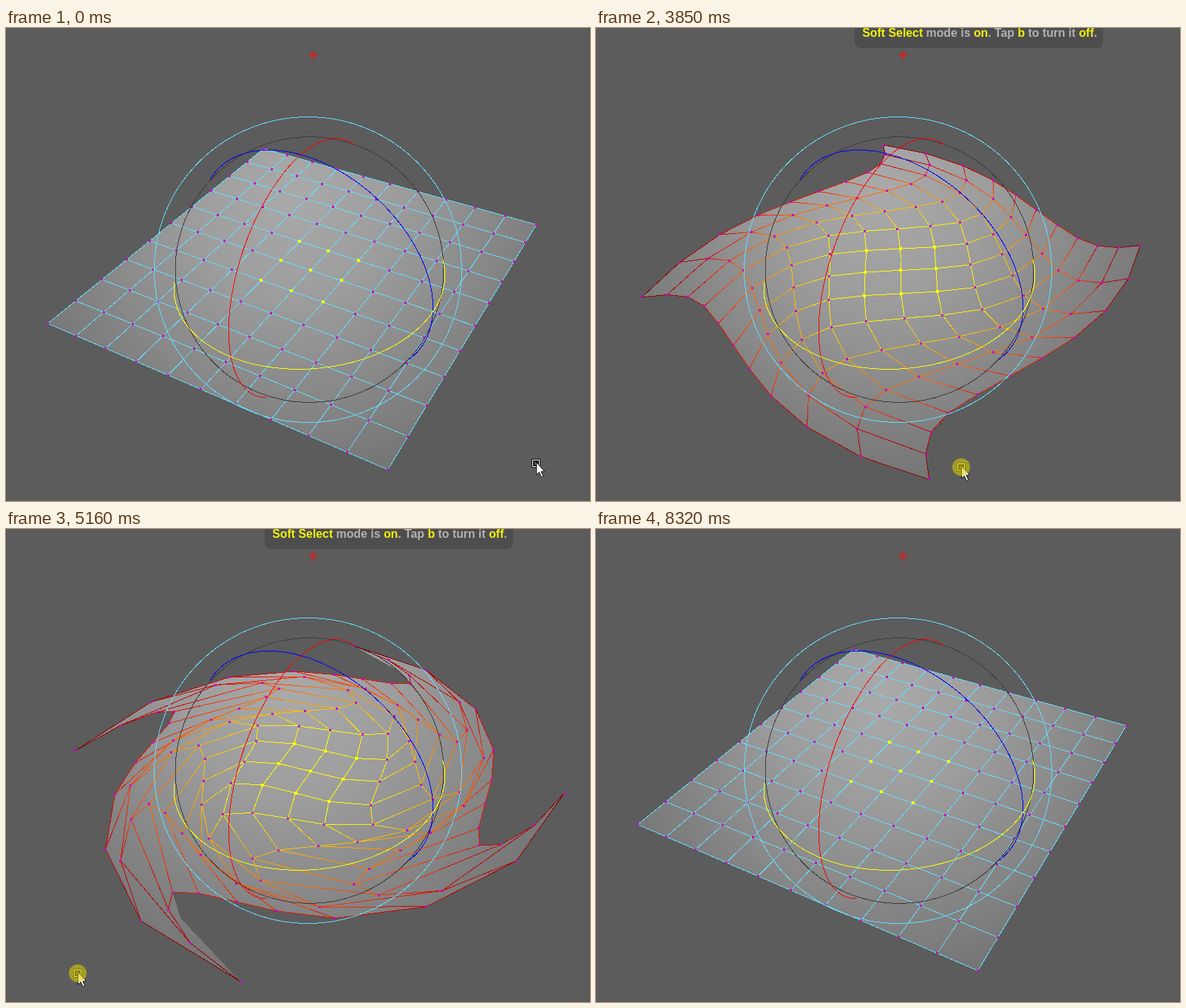
Recreate the animation shown at these times as an HTML page. Size 790 px wide and 641 px high, loop 9.08 s.

```html
<!DOCTYPE html>
<html lang="en">
<head>
<meta charset="utf-8">
<title>Soft select twist</title>
<style>
html, body { margin: 0; width: 100%; height: 100%; overflow: hidden; background: #5c5c5c; }
svg { display: block; }
.crisp { shape-rendering: crispEdges; fill: none; stroke-width: 1; }
text { font: bold 15.85px "Liberation Sans", Arial, sans-serif; fill: #b2b2b2; }
.hot { fill: #f0f010; }
</style>
</head>
<body>
<svg id="stage" width="790" height="641" viewBox="0 0 790 641">
  <defs>
    <radialGradient id="shade" gradientUnits="userSpaceOnUse" cx="388" cy="225" r="420">
      <stop offset="0" stop-color="#aaaaaa"/>
      <stop offset=".35" stop-color="#9c9c9c"/>
      <stop offset="1" stop-color="#707070"/>
    </radialGradient>
  </defs>
  <rect width="790" height="641" fill="#5c5c5c"/>
  <rect x="787" width="3" height="641" fill="#595959"/>
  <g class="crisp" transform="translate(.5 .5)">
    <path id="skin" fill="url(#shade)"/>
    <g id="wires"></g>
    <path id="dots" stroke="#c800c8" stroke-width="3"/>
    <path id="picked" stroke="#ffff00" stroke-width="4"/>
    <ellipse cx="410" cy="327" rx="181.5" ry="180" stroke="#3c3c3c"/>
    <ellipse cx="408" cy="327" rx="208" ry="207" stroke="#64dcff"/>
    <g id="rings"></g>
    <path d="M408 36H422M415 30V43M412 33H418V39H412Z" stroke="#e01818"/>
  </g>
  <g id="note">
    <rect x="350" y="-20" width="336" height="47" rx="8" fill="#4d4d4d"/>
    <text x="360.3" y="11.5"><tspan class="hot">Soft Select</tspan> mode is <tspan class="hot">on</tspan>. Tap <tspan class="hot">b</tspan> to turn it <tspan class="hot">off</tspan>.</text>
  </g>
  <g id="cursor">
    <g fill="none">
      <rect x="-4.5" y="-4.5" width="9" height="9" stroke="#111" stroke-width="3"/>
      <rect x="-4.5" y="-4.5" width="9" height="9" stroke="#fff"/>
      <rect x="-2.5" y="-2.5" width="5" height="5" stroke="#111"/>
    </g>
    <path d="M.5 -1.5V15.5L4.2 12L7.3 18.5L9.8 17.2L6.8 11H11.5Z" fill="#fff" stroke="#111"/>
    <path id="minus" d="M8 -.5H19" stroke="#111" stroke-width="3"/>
    <path id="minusTop" d="M9 -.5H18" stroke="#fff"/>
    <circle id="press" r="12" fill="#d2ca00" fill-opacity=".6"/>
  </g>
</svg>
<script>
const LOOP = 9080, N = 10, RADIUS = 7.56, BUCKETS = 32, PARTS = 4;
const $ = id => document.getElementById(id);
const clamp = v => Math.max(0, Math.min(1, v));
const fix = v => v.toFixed(1);
const rad = d => d * Math.PI / 180;

// Projected axes of the plane (u, v), its normal (up) and its centre.
const U = [273.35, 67.52, -.1334], V = [-306.34, 134.56, -.2561];
const UP = [-122.4, -372.6, -.2364], MID = [331.5, 264.04, .80525];

function project(a, p, b, q) {
  const [x, y, z] = MID.map((m, i) => m + a[i] * p + b[i] * q);
  return [x / z, y / z];
}

function turn(x, y, deg) {
  const c = Math.cos(rad(deg)), s = Math.sin(rad(deg));
  return project(U, (x * c - y * s) / N, V, (x * s + y * c) / N);
}

// Cosine falloff by distance to the nearest picked vertex.
function falloff(x, y) {
  const t = clamp(Math.hypot(Math.max(0, Math.abs(x) - 1), Math.max(0, Math.abs(y) - 1)) / RADIUS);
  return (1 + Math.cos(Math.PI * t)) / 2;
}

function heat(w) {
  const r = Math.round(255 * clamp(.3 + 1.3 * w));
  const g = Math.round(255 * clamp((w - .4) / .58));
  return `rgb(${r},${g},0)`;
}

const at = (i, j) => j * (N + 1) + i;
const verts = [], edges = [];
for (let j = 0; j <= N; j++) for (let i = 0; i <= N; i++) {
  const x = i - 5, y = j - 5;
  verts.push({ x, y, w: falloff(x, y), picked: Math.abs(x) < 2 && Math.abs(y) < 2 });
  if (i < N) edges.push([at(i, j), at(i + 1, j)]);
  if (j < N) edges.push([at(i, j), at(i, j + 1)]);
}

function addPath(parent, stroke) {
  const p = document.createElementNS("http://www.w3.org/2000/svg", "path");
  p.setAttribute("stroke", stroke);
  parent.appendChild(p);
  return p;
}

const wires = Array.from({ length: BUCKETS }, (_, k) => addPath($("wires"), heat(k / (BUCKETS - 1))));
const plain = addPath($("wires"), "#64dcff");

function ring(color, a, b, from) {
  let d = "";
  for (let k = 0; k <= 90; k++) {
    const t = rad(from + 2 * k);
    const p = project(a, .38 * Math.cos(t), b, .38 * Math.sin(t));
    d += (k ? "L" : "M") + p.map(fix);
  }
  addPath($("rings"), color).setAttribute("d", d);
}
ring("#ff0000", V, UP, -45);
ring("#0000ff", U, UP, -34.6);
ring("#ffff00", U, V, -34.6);

const seg = (p, q) => `M${p.map(fix)}L${q.map(fix)}`;
const dot = (p, r) => `M${fix(p[0] - r)} ${fix(p[1])}h${2 * r}`;
const mix = (p, q, k) => [p[0] + (q[0] - p[0]) * k, p[1] + (q[1] - p[1]) * k];

// Triangles share one winding so that folds never cancel out.
function tri(a, b, c) {
  const area = (b[0] - a[0]) * (c[1] - a[1]) - (b[1] - a[1]) * (c[0] - a[0]);
  return `M${a.map(fix)}L${(area < 0 ? [c, b] : [b, c]).map(p => p.map(fix)).join("L")}Z`;
}

function skin(pts, angle, soft) {
  let d = "";
  for (let j = 0; j < N; j++) for (let i = 0; i < N; i++) {
    const a = pts[at(i, j)], b = pts[at(i + 1, j)], c = pts[at(i + 1, j + 1)], e = pts[at(i, j + 1)];
    d += tri(a, b, c) + tri(a, c, e);
  }
  if (soft && angle > 150) for (const s of [1, -1]) {
    const m = turn(-5.05 * s, -3.03 * s, falloff(5, 3) * angle - 4);
    const rim = [0, 1, 2, 3].map(k => pts[s > 0 ? at(0, k) : at(N, N - k)]);
    for (let k = 0; k < 3; k++) d += tri(rim[k], rim[k + 1], m);
  }
  return d;
}

let last = "";
function drawMesh(angle, soft) {
  const state = angle + "/" + soft;
  if (state === last) return;
  last = state;
  const pts = verts.map(v => turn(v.x, v.y, angle * (soft ? v.w : +v.picked)));
  $("skin").setAttribute("d", skin(pts, angle, soft));

  const lines = Array(BUCKETS).fill("");
  let cold = "";
  for (const [a, b] of edges) {
    if (!soft) { cold += seg(pts[a], pts[b]); continue; }
    for (let k = 0; k < PARTS; k++) {
      const w = verts[a].w + (verts[b].w - verts[a].w) * (k + .5) / PARTS;
      lines[Math.round(w * (BUCKETS - 1))] +=
        seg(mix(pts[a], pts[b], k / PARTS), mix(pts[a], pts[b], (k + 1) / PARTS));
    }
  }
  wires.forEach((p, k) => p.setAttribute("d", lines[k]));
  plain.setAttribute("d", cold);

  let dots = "", picked = "";
  pts.forEach((p, k) => {
    if (verts[k].picked) picked += dot(p, 2);
    else dots += dot(p, 1.5);
  });
  $("dots").setAttribute("d", dots);
  $("picked").setAttribute("d", picked);
}

// time, cursor x, cursor y, twist angle
const keys = [
  [0, 717, 590, 0], [70, 716, 590, 0], [300, 700, 591, 6], [600, 650, 591, 23],
  [900, 541, 592, 60], [1210, 324, 597, 135], [1450, 265, 598, 153], [1600, 255, 598, 157],
  [1900, 252, 597, 158], [2209, 252, 597, 158], [2210, 252, 597, 0],
  [2990, 252, 597, 0], [3150, 270, 597, 0], [3420, 680, 590, 0], [3520, 700, 590, 0],
  [3700, 610, 592, 25], [3850, 495, 595, 58], [4100, 345, 602, 100], [4390, 255, 604, 127],
  [4770, 150, 604, 159], [5160, 97, 602, 173.2], [5540, 46, 590, 186.3], [7009, 46, 590, 186.3],
  [7010, 46, 590, 0], [7930, 46, 590, 0], [8090, 170, 602, 0], [8240, 560, 582, 0],
  [8320, 668, 568, 0], [LOOP, 717, 590, 0]
];

function pose(t) {
  const i = keys.findIndex(k => k[0] > t);
  const a = keys[i - 1], b = keys[i], k = (t - a[0]) / (b[0] - a[0]);
  return [1, 2, 3].map(c => a[c] + (b[c] - a[c]) * k);
}

const show = (id, on) => $(id).setAttribute("visibility", on ? "inherit" : "hidden");
const within = (t, a, b) => t >= a && t < b;

function draw(t) {
  const [x, y, angle] = pose(t);
  drawMesh(angle, within(t, 2990, 7860));
  $("cursor").setAttribute("transform", `translate(${Math.round(x)} ${Math.round(y)})`);
  show("cursor", t < 8320);
  show("press", within(t, 70, 1900) || within(t, 3520, 5690));
  const ctrl = within(t, 2060, 2440) || within(t, 6770, 7150);
  show("minus", ctrl);
  show("minusTop", ctrl);
  $("note").setAttribute("opacity", t < 2990 ? 0 : Math.min(clamp((t - 2950) / 340), clamp((6540 - t) / 640)));
}

const start = performance.now();
function tick() {
  draw((performance.now() - start) % LOOP);
  requestAnimationFrame(tick);
}
tick();
</script>
</body>
</html>
```
